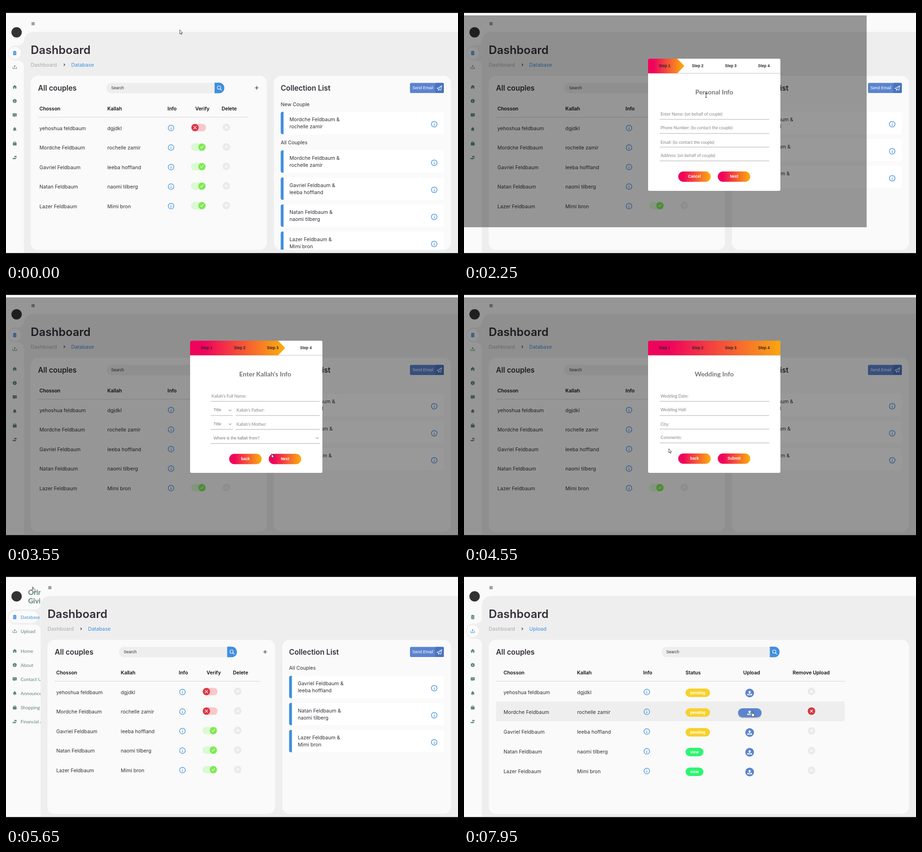
An HTML page that plays this animation: 960 by 540 pixels, repeating every 8000 ms.

```html
<!DOCTYPE html>
<html lang="en">
<head>
<meta charset="utf-8">
<title>Dashboard</title>
<style>
html, body { margin: 0; width: 100%; height: 100%; overflow: hidden; background: #000; }
svg { display: block; width: 100vw; height: 100vh; font: 10.6px Inter, sans-serif; fill: #342e37; }
.h { font-weight: 600; }
.th { font-weight: 600; font-size: 10.4px; fill: #111; }
.lato { font-family: Lato, sans-serif; font-size: 10px; }
.brand { font: 700 15px Lato, sans-serif; fill: #5f8575; }
.arial { font: 8.6px "Liberation Sans", Arial, sans-serif; }
.bold { font: 700 8.2px "Liberation Sans", Arial, sans-serif; }
.form { font: 9px Lato, sans-serif; fill: #858585; }
.title { font: 700 13.8px Lato, sans-serif; fill: #757575; }
.mid { text-anchor: middle; }
.line { fill: none; stroke-linecap: round; stroke-linejoin: round; }
</style>
</head>
<body>
<svg id="stage" viewBox="0 0 960 540"></svg>
<script>
const LOOP = 8000, BLUE = '#418fde', GREEN = '#5f8575', INDIGO = '#5b84cf', PAPER = '#fafafa', GREY = '#eee';
const stage = document.getElementById('stage');
const couples = [
  ['yehoshua feldbaum', 'dgjdkl'], ['Mordche Feldbaum', 'rochelle zamir'],
  ['Gavriel Feldbaum', 'leeba hoffland'], ['Natan Feldbaum', 'naomi tilberg'],
  ['Lazer Feldbaum', 'Mimi bron']
];
const brand = ['Orlmont', 'Wedded', 'Giving', 'Society'];
const menu = [
  ['Database', 100, 'db'], ['Upload', 130, 'up'], ['Home', 172, 'home'], ['About', 202, 'info'],
  ['Contact Us', 232, 'chat'], ['Announcements', 262, 'bell'], ['Shopping Guide', 292, 'bag'],
  ['Financial Assistance', 322, 'hand']
];
// time, x, y, shape: arrow, hand or beam
const track = [
  [0, 369, 51, 'a'], [50, 381, 96, 'a'], [150, 381, 96, 'a'], [400, 405, 297, 'h'], [1000, 405, 297, 'h'],
  [1400, 448, 266, 'h'], [1450, 448, 266, 'h'], [1800, 515, 190, 'a'], [1900, 531, 173, 'h'],
  [2150, 531, 173, 'i'], [2250, 514, 190, 'i'], [2700, 570, 360, 'h'], [3450, 564, 353, 'a'],
  [3550, 564, 353, 'a'], [3800, 568, 358, 'h'], [4000, 568, 358, 'a'], [4400, 435, 342, 'a'],
  [4550, 435, 342, 'a'], [4600, 384, 202, 'a'], [4800, 384, 202, 'a'], [5000, 200, 110, 'a'],
  [5150, 130, 75, 'a'], [5350, 130, 75, 'a'], [5500, 57, 36, 'h'], [6150, 57, 36, 'a'],
  [6450, 66, 178, 'h'], [6600, 77, 134, 'h'], [7150, 77, 134, 'a'], [7350, 250, 190, 'a'],
  [7550, 250, 190, 'a'], [7850, 612, 301, 'h'], [8000, 612, 301, 'h']
];

const clamp = u => Math.max(0, Math.min(1, u));
const span = (t, start, dur) => clamp((t - start) / dur);
const smooth = u => u * u * (3 - 2 * u);
const out = u => 1 - (1 - u) ** 2;
const mix = (a, b, u) => a + (b - a) * u;

const text = (x, y, s, cls = '', extra = '') =>
  `<text x="${x}" y="${y}" class="${cls}" ${extra}>${s.replace(/&/g, '&amp;')}</text>`;
const rect = (x, y, w, h, fill, r = 0, extra = '') =>
  `<rect x="${x}" y="${y}" width="${w}" height="${h}" rx="${r}" fill="${fill}" ${extra}/>`;
const circle = (x, y, r, fill, extra = '') => `<circle cx="${x}" cy="${y}" r="${r}" fill="${fill}" ${extra}/>`;
const path = (d, fill) => `<path d="${d}" fill="${fill}"/>`;
const line = (d, color, w = 1) => `<path class="line" d="${d}" stroke="${color}" stroke-width="${w}"/>`;
const at = (x, y, s) => `<g transform="translate(${x} ${y})">${s}</g>`;
const rule = (x1, x2, y, color) => line(`M${x1} ${y}H${x2}`, color, .8);
const cross = (r, color, w = 1) => line(`M${-r} ${-r}L${r} ${r}M${r} ${-r}L${-r} ${r}`, color, w);

const icons = {
  db: c => path('M-3.5 -3a3.5 1.5 0 0 1 7 0v6a3.5 1.5 0 0 1 -7 0z', c) +
    line('M-3.5 -2q3.5 2 7 0M-3.5 1q3.5 2 7 0', PAPER, .7),
  up: c => line('M-4 0v3h8v-3M0 1v-4.5M-1.8 -1.8L0 -3.6L1.8 -1.8', c),
  home: c => path('M-4.6 .2L0 -4.2L4.6 .2H3.4V4H1V1.2H-1V4H-3.4V.2z', c),
  info: c => circle(0, 0, 4.2, c) + line('M0 -.3V2M0 -2v.1', '#fff', 1.1),
  chat: c => path('M-4.3 -3.8H4.3V2.4H.5L-2 4.4V2.4H-4.3z', c) +
    line('M-2 -.7h.1M0 -.7h.1M2 -.7h.1', '#fff', 1.1),
  bell: c => path('M-4 2.6Q-2.8 1.5 -2.8 -1Q-2.5 -3.4 0 -4.2Q2.5 -3.4 2.8 -1Q2.8 1.5 4 2.6zM-1.2 3.3h2.4q-1.2 2 -2.4 0z', c),
  bag: c => rect(-4, -1.6, 8, 6, c, 1) + line('M-2 -1.6v-1q2 -2.8 4 0v1', c, 1.1),
  hand: c => path('M-4.5 1.2H-2L0 .6L2 1.4L4.6 0L2 3.5H-4.5z', c) + circle(.4, -2, 1.5, c) + circle(2.7, -2, 1.5, c)
};
const infoRing = (x, y) => at(x, y, circle(0, 0, 6, 'none', `stroke="${BLUE}" stroke-width="1.3"`) +
  line('M0 -.3V3M0 -2.8v.1', BLUE, 1.3));
const remove = (x, y, color = '#eaeaea') => at(x, y, circle(0, 0, 8, color) + cross(2.4, '#fff', 1.3));

function toggle(x, y, on) {
  const mark = on > .5 ? line('M-3 0L-1 2.4L3 -2.8', '#fff', 1.1) : cross(2.8, '#fff', 1.1);
  return at(x, y, rect(-16, -8, 32, 16, on > .5 ? '#dcf9d3' : '#f8c7cc', 8) +
    at(mix(-7.5, 7, on), 0, circle(0, 0, 7.7, on > .5 ? '#7eea51' : '#dc3545') + mark));
}

function search(x) {
  const b = x + 230;
  return path(`M${b} 163.5H${x + 11}a11 11 0 0 0 0 22H${b}z`, GREY) + text(x + 10.3, 177.3, 'Search', 'arial') +
    path(`M${b} 163h9.5a11 11 0 0 1 0 22.5h-9.5z`, BLUE) +
    line(`M${b + 12} 176.2l2.6 2.6`, '#fff', 1.3) + circle(b + 9.4, 173.4, 3.4, 'none', 'stroke="#fff" stroke-width="1.2"');
}

function sidebar(p, page, bare, cur) {
  const w = mix(38, 175, p), y = menu[page][1];
  let s = `<clipPath id="side"><rect y="14" width="${w}" height="512"/></clipPath><g clip-path="url(#side)">`;
  if (bare) {
    s += rect(0, 20, 38, 506, '#f3f3f3') + rect(0, 20, 38, 18, '#e8e8e8') + rect(0, 38, 38, 36, PAPER);
    brand.forEach((word, i) => s += text(25, 36 + 18 * i, word, 'brand'));
  } else {
    s += circle(22.5, 56, 11, '#333') + text(47, 53, brand[0] + ' ' + brand[1], 'brand') +
      text(47, 71, brand[2] + ' ' + brand[3], 'brand');
    s += path(`M${w} ${y - 30}q0 14 -14 14H20a16 16 0 0 0 0 32H${w - 14}q14 0 14 14z`, GREY) +
      rect(6, y - 13, mix(25.5, 166, p), 26, PAPER, 13);
  }
  menu.forEach(([label, my, icon], i) => {
    const hover = p > .9 && cur.x < w && Math.abs(cur.y + 3 - my) < 14;
    const color = i === page || hover ? BLUE : GREEN;
    if (bare) s += circle(18.5, my, 12.8, PAPER);
    s += at(18.5, my, icons[icon](color));
    if (p > 0) s += text(31, my + 3.7, label, 'lato', `style="fill:${color}"`);
  });
  return s + '</g>';
}

function person(x, y, name, wrap) {
  return (wrap ? name.split(' ') : [name]).map((s, i) => text(x, y + 15 * i, s)).join('');
}

function database(p, bare, cur, on, modal) {
  const m = (a, b) => mix(a, b, p), wrap = p > .5;
  const left = m(52.5, 190), col = { name: m(71, 209), kallah: m(215.3, 325.5), info: m(350.5, 444), verify: m(409, 502.5), del: m(468, 561) };
  const x1 = m(68, 205), x2 = m(514, 608), pitch = bare ? 35.8 : wrap ? 56.5 : 41.5;
  let s = rect(left, 148.5, m(554, 622) - left, 370, PAPER, 15) + text(x1, 180, 'All couples', 'h', 'font-size="15.4"') +
    search(m(213, 316)) + line(`M${m(529, 597.5)} 174h7m-3.5 -3.5v7`, '#222', 1.1);
  [['Chosson', col.name], ['Kallah', col.kallah], ['Info', m(343, 436)], ['Verify', m(402, 495)], ['Delete', m(458, 551)]]
    .forEach(([h, x]) => s += text(x, 222, h, 'th'));
  s += rule(x1, x2, 236.5, '#ccc') + '<clipPath id="rows"><rect y="230" width="960" height="274"/></clipPath><g clip-path="url(#rows)">';
  couples.forEach(([a, b], i) => {
    const top = 236.8 + pitch * i, y = bare ? 253.5 + pitch * i : 260 + pitch * i;
    if (!modal && cur.x > x1 && cur.x < x2 && cur.y >= top && cur.y < top + pitch)
      s += rect(x1, top, x2 - x1, pitch - .5, GREY);
    s += person(col.name, y + 3.8, a, wrap) + person(col.kallah, y + 3.8, b, wrap && b.length > 13) +
      infoRing(col.info, bare ? y + 2.8 : y - .6) + toggle(col.verify, bare ? y : y - 1.5, i === 0 ? 0 : i === 1 ? on : 1);
    s += bare && i < 4 ? at(463, y + 2.6, circle(0, 0, 4.3, '#111') + cross(1.4, '#fff'))
      : remove(col.del, bare ? y + 2.5 : y - 2);
  });
  return s + '</g>';
}

function collection(x, fresh, bare) {
  const tx = x + 14.5;
  const card = (i, y) => rect(tx + 4, y, 930 - tx - 4, 47.5, '#fff', 4) +
    path(`M${tx + 6} ${y}h-2a4 4 0 0 0 -4 4v39.5a4 4 0 0 0 4 4h2z`, BLUE) +
    text(x + 33, y + 20.3, couples[i][0] + ' &') + text(x + 33, y + 35.3, couples[i][1]) + infoRing(909.5, y + 26.3);
  const bx = bare ? 868 : 858;
  let s = `<clipPath id="list"><rect x="${x}" y="148" width="376" height="370"/></clipPath>` +
    rect(x, 148.5, 945 - x, 370, PAPER, 15) + text(tx, 180, 'Collection List', 'h', 'font-size="15.4"') +
    rect(bx, 163.5, 930 - bx, 21.5, INDIGO, 2.5) + rect(bare ? 919 : 911.5, 163.5, bare ? 11 : 18.5, 21.5, '#4a74bf', 2.5) +
    text(bx + 5.2, 177.3, 'Send Email', 'arial', 'style="fill:#fff"');
  if (!bare) s += line('M915.5 175L925.5 169.5L923.5 179L920 177L918.5 180V176.5L925.5 169.5M915.5 175L918.5 176.5', '#fff');
  s += '<g clip-path="url(#list)">';
  if (fresh) s += text(tx, 212.5, 'New Couple') + card(1, 225);
  const y = fresh ? 307 : 225;
  s += text(tx, y - 12.7, 'All Couples');
  for (let i = fresh ? 1 : 2, k = 0; i < 5; i++, k++) s += card(i, y + 57.5 * k);
  return s + '</g>';
}

function uploads(cur) {
  let s = rect(52.5, 148.5, 892.5, 370, PAPER, 15) + text(68, 180, 'All couples', 'h', 'font-size="15.4"') + search(419.5);
  [['Chosson', 84], ['Kallah', 240], ['Info', 380.5], ['Status', 470.5], ['Upload', 593], ['Remove Upload', 698]]
    .forEach(([h, x]) => s += text(x, 222, h, 'th'));
  s += rule(68, 808.5, 236.5, '#ccc');
  couples.forEach(([a, b], i) => {
    const y = 260 + 42 * i, top = y - 24;
    const hover = cur.x > 68 && cur.x < 808 && cur.y > top && cur.y < top + 42;
    const pressed = hover && Math.abs(cur.x - 607) < 25, pending = i < 3, w = pending ? 52 : 38;
    if (hover) s += rect(68, top + 1.5, 740.5, 42, GREY);
    s += text(84, y + 3.8, a) + text(240.3, y + 3.8, b) + infoRing(388.3, y - .6) +
      rect(470.5, y - 8, w, 18, pending ? '#f8d12b' : '#2bf571', 9) +
      text(470.5 + w / 2, y + 4, pending ? 'pending' : 'view', 'mid', 'style="font-weight:700;font-size:8px;fill:#fff"');
    if (pressed) s += rect(582, y - 6, 50, 19, '#0003', 9.5);
    s += pressed ? rect(582, y - 8, 50, 19, INDIGO, 9.5) : circle(606.7, y + 1.5, 9.3, INDIGO);
    s += at(606.7, y + 1.5, path('M0 -5L3.5 -1.3H1.2V2H-1.2V-1.3H-3.5zM-5 1.8H-2.2V3.2H2.2V1.8H5V4.8H-5z', '#fff')) +
      remove(738, y - 2, hover ? '#d13a45' : undefined);
  });
  return s;
}

function dialog(t) {
  const step = 1 + (t >= 2900) + (t >= 3350) + (t >= 3800);
  const move = [[2900, 468, 531], [3350, 531, 593], [3800, 593, 687]];
  const tip = move.reduce((x, [start, a, b]) => t >= start ? mix(a, b, out(span(t, start, 200))) : x, 468);
  const dx = step === 2 || step === 3 ? 19 : 0;
  let s = '<clipPath id="box"><rect x="391" y="112" width="281" height="281" rx="3"/></clipPath><g clip-path="url(#box)">' +
    rect(391, 112, 281, 281, '#fff') + rect(391, 142.5, 281, 1.2, '#ccc') +
    path(`M391 112H${tip - 15}L${tip} 127.5L${tip - 15} 143H391z`, 'url(#warm)');
  for (let i = 0; i < 4; i++) s += text(426 + 70.3 * i, 130.3, 'Step ' + (i + 1), 'bold mid', 'style="fill:#2b2530"');
  const who = step === 2 ? 'Chosson' : 'Kallah', x = 416 + dx;
  const heading = step === 1 ? 'Personal Info' : step === 4 ? 'Wedding Info' : `Enter ${who}'s Info`;
  s += text(531.5 + dx, 187.5, heading, 'title mid');
  const chevron = (cx, cy) => line(`M${cx - 2.3} ${cy - 1}l2.3 2.3l2.3 -2.3`, '#555');
  if (dx) {
    s += text(x + 1.5, 233.2, who + "'s Full Name:", 'form') + rule(x, x + 231, 241, '#999');
    ['Father', 'Mother'].forEach((parent, i) => {
      const y = 260 + 29.5 * i;
      s += text(x + 6, y + 2.3, 'Title', 'arial', 'style="fill:#777"') + chevron(x + 41, y) +
        text(x + 54.5, y + 3, `${who}'s ${parent}:`, 'form') + rule(x, x + 46, y + 11, '#999') + rule(x + 53, x + 231, y + 11, '#999');
    });
    s += text(x + 6, 321.6, `Where is the ${who.toLowerCase()} from?`, 'arial', 'style="fill:#777"') +
      chevron(x + 226, 319) + rule(x, x + 231, 330.5, '#999');
  } else {
    const labels = step === 1
      ? ['Enter Name: (on behalf of couple)', 'Phone Number: (to contact the couple)', 'Email: (to contact the couple)', 'Address: (on behalf of couple)']
      : ['Wedding Date:', 'Wedding Hall:', 'City:', 'Comments:'];
    labels.forEach((label, i) => s += text(417.5, [233.2, 261.5, 292.6, 320.8][i], label, 'form') +
      rule(416, 648, [241, 271, 300, 329.3][i], '#999'));
  }
  [[455, step === 1 ? 'Cancel' : 'back'], [539, step === 4 ? 'Submit' : 'Next']].forEach(([bx, label]) =>
    s += rect(bx + dx, dx ? 352.5 : 351.8, 69, 22, 'url(#warm)', 11) +
      text(bx + dx + 34.5, dx ? 366.3 : 365.3, label, 'bold mid', 'style="fill:#fff"'));
  return s + '</g>';
}

function pointer(c) {
  if (c.kind === 'i') return at(c.x, c.y, line('M-1.5 -4.5h3M0 -4.5v9M-1.5 4.5h3', '#222', .9));
  const d = c.kind === 'h'
    ? 'M-.8 .4q.9 -.9 1.6 0V4l3.4 .8q1 .4 .8 1.6L4.3 10.5H.3L-2.6 6.6q-.2 -1.2 .8 -.8l1 .8z'
    : 'M0 0V8.4L2 6.6L3.4 9.6L4.6 9L3.2 6.2H5.6z';
  return at(c.x, c.y, path(d, '#fff') + line(d, '#222', .8));
}

function cursorAt(t) {
  const i = track.findIndex((k, n) => n + 1 < track.length && t < track[n + 1][0]);
  const a = track[i], b = track[i + 1], u = smooth(span(t, a[0], b[0] - a[0]));
  return { x: mix(a[1], b[1], u), y: mix(a[2], b[2], u), kind: a[3] };
}

const defs = '<defs><linearGradient id="warm"><stop offset=".15" stop-color="#f0035c"/>' +
  '<stop offset="1" stop-color="#fbb00c"/></linearGradient></defs>';

function scene(t) {
  const cur = cursorAt(t), page = +(t >= 6800);
  const bare = t >= 1300 && t < 1600 || t >= 6800 && t < 7100;
  const p = page ? 0 : smooth(span(t, 5550, 300));
  const cover = t < 4000 ? out(span(t, 2100, 224)) : (1 - span(t, 4815, 224)) ** 2;
  const side = mix(38, 175, p), left = mix(52.5, 190, p);
  let s = defs + rect(0, 0, 960, 540, '#000') + rect(0, 14.7, 960, 511, '#fff') + rect(0, 19.5, 960, 506, PAPER) +
    path(`M${side} 526V75a20 20 0 0 1 20 -20H960V526z`, GREY) + sidebar(p, page, bare, cur) +
    line(`M${left + 2} 35.3h6m-6 2.3h6m-6 2.3h6`, '#342e37', 1) +
    text(left, 102.3, 'Dashboard', 'h', 'font-size="24.1"') +
    text(left, 129.4, 'Dashboard', '', 'style="fill:#aaa;font-size:10.8px"') +
    line(`M${left + 70.5} 123l2 2l-2 2`, '#342e37', 1.1) +
    text(left + 86, 129.4, menu[page][0], '', `style="fill:${BLUE};font-size:10.8px"`);
  s += page ? uploads(cur)
    : database(p, bare, cur, 1 - smooth(span(t, 550, 200)), cover > 0) + collection(mix(569, 637.7, p), t < 1300, bare);
  if (cover > 0) {
    const k = clamp((cover - .1) / .75);
    s += rect(0, 20, 960 * cover, 505.5 * cover, '#000', 0, 'opacity=".4"');
    if (k > 0) s += `<g transform="translate(531.5 252.5) scale(${k}) translate(-531.5 -252.5)">${dialog(t)}</g>`;
  }
  return s + rect(0, 525.3, 960, 15, '#000') + pointer(cur);
}

let shown = -1;
const began = performance.now();
function frame() {
  const t = Math.floor(((performance.now() - began) % LOOP) / 50) * 50;
  if (t !== shown) stage.innerHTML = scene(shown = t);
  requestAnimationFrame(frame);
}
frame();
</script>
</body>
</html>
```
